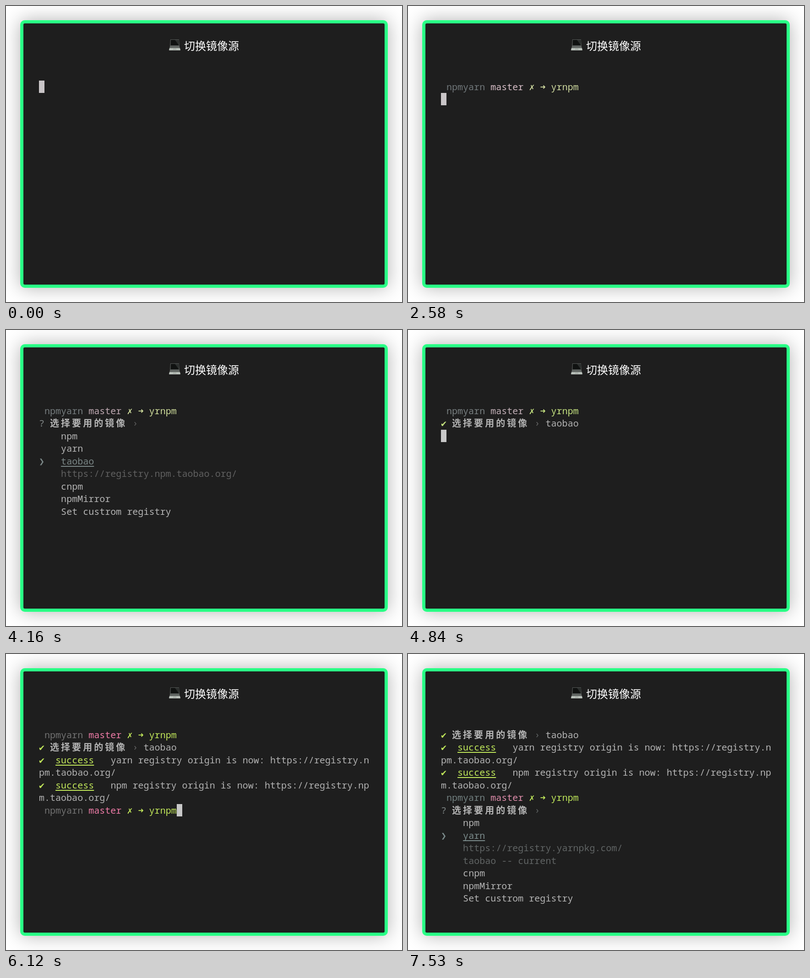
An HTML page for the animation above (8 s loop, 865x647 px).

```html
<!DOCTYPE html>
<html lang="zh-CN">
<head>
<meta charset="utf-8">
<title>切换镜像源</title>
<style>
  html, body { margin: 0; width: 100%; height: 100%; overflow: hidden; background: #fff; }
  #window {
    position: absolute; left: 31px; top: 31px; width: 803px; height: 585px;
    box-sizing: border-box; border: 7px solid #29ff86; border-radius: 10px;
    background: #1e1e1e; box-shadow: 0 0 40px rgba(0, 0, 0, .3);
  }
  #title {
    position: absolute; left: 389px; top: 68px; white-space: nowrap; color: #fff;
    font: 500 24px/36px "Noto Sans CJK SC", "Noto Sans CJK", sans-serif;
  }
  #laptop { position: absolute; left: 356px; top: 72px; }
  #screen {
    position: absolute; left: 72px; top: 163px;
    font: 20.05px/27.46px "Noto Sans Mono", "DejaVu Sans Mono", "Noto Sans CJK SC", "Noto Sans CJK", monospace;
    font-variant-ligatures: none;
  }
  #screen span { position: absolute; white-space: pre; color: var(--text); }
  #screen .dim { color: var(--dim); }
  #screen .branch { color: var(--branch); }
  #screen .green { color: var(--green); }
  #screen .command { color: var(--green); font-weight: 500; }
  #screen .mute { color: var(--mute); }
  #screen .ask { color: var(--ask); }
  #screen .accent { color: var(--accent); }
  #screen .warn { color: #f0a63c; }
  #screen .question { font-weight: 700; letter-spacing: 4px; }
  #screen .underline { text-decoration: underline 1.5px; text-underline-offset: 3px; text-decoration-skip-ink: none; }
  #screen .cursor { width: 12px; height: 27px; background: var(--cursor); }
</style>
</head>
<body>
<div id="window"></div>
<svg id="laptop" width="26" height="27">
  <path d="M3 1H22L23 16H2Z" fill="#555957"/>
  <path d="M4 2H21.500V14H3.500Z" fill="#101211"/>
  <path d="M13 2H21.500V14Z" fill="#2b2e2d"/>
  <path d="M2 16H23L24 21H1Z" fill="#626764"/>
  <path d="M1 20H24L25 24Q25 25 24 25H1Q0 25 0 24Z" fill="#b9c0ba"/>
  <path d="M9 21H16L16.500 23.500H8.500Z" fill="#a3aaa4"/>
</svg>
<div id="title">切换镜像源</div>
<div id="screen"></div>
<script>
const LOOP = 8000, CELL = 12.03, ROW = 27.46, COLS = 60, MAX_ROWS = 14;
const screen = document.getElementById("screen");

const roles = ["dim", "branch", "green", "text", "mute", "ask", "accent", "cursor"];
const palettes = [
  [0, "#70777a #d8bfc8 #d0dba0 #b5b5b5 #606060 #858b8b #7b8787 #c9c5c7"],
  [2770, "#757c7e #c0aab3 #d0de9c #b5b5b5 #606060 #858b8b #7b8787 #c7c7c7"],
  [4840, "#787f80 #c3b0b8 #c6e480 #b2b2b2 #6a6a6a #858b8b #7b8787 #c8c8c8"],
  [5150, "#727272 #ee7ba7 #c2e85a #b2b2b2 #666666 #b8b8b8 #777777 #c8c8c8"],
  [6940, "#696969 #ea7ba7 #c0e858 #b2b2b2 #636363 #bababa #777777 #c8c8c8"],
  [7530, "#728080 #df8dab #c0e85a #b4b4b4 #606464 #808888 #7b8b8b #c8c8c8"],
];

const options = ["npm", "yarn", "taobao", "cnpm", "npmMirror", "Set custrom registry"];
const urls = {
  npm: "https://registry.npmjs.org/",
  yarn: "https://registry.yarnpkg.com/",
  taobao: "https://registry.npm.taobao.org/",
};

// A row is a list of runs: column, style, text.
const run = (col, style, text) => ({ col, style, text });
const cursor = col => run(col, "cursor", "");

function prompt(typed = "", hasCursor = false) {
  const row = [
    run(1, "dim", "npmyarn"), run(9, "branch", "master"), run(16, "green", "✗"), run(18, "green", "➜"),
    run(20, typed === "yrnpm" ? "command" : "branch", typed),
  ];
  return hasCursor ? [...row, cursor(20 + typed.length)] : row;
}

const question = (mark, style, answer) =>
  [run(0, style, mark), run(2, "question", "选择要用的镜像"), run(17, "mute", "›"), ...answer];

function menu(selected, current) {
  const blocked = selected === current;
  const rows = [question("?", "ask", blocked ? [run(19, "warn", "- This option is disabled")] : [])];
  for (const name of options) {
    const active = name === selected, disabled = name === current;
    const style = disabled ? "mute" : active ? "accent" : "text";
    const row = [run(4, style + (active ? " underline" : ""), name + (disabled ? " -- current" : ""))];
    if (active) row.push(run(0, "accent", "❯"));
    rows.push(row);
    if (active && !disabled) rows.push([run(4, "mute", urls[name])]);
  }
  return rows;
}

function success(tool) {
  const message = `${tool} registry origin is now: ${urls.taobao}`, room = COLS - 13;
  return [
    [run(0, "green", "✔"), run(3, "green underline", "success"), run(13, "text", message.slice(0, room))],
    [run(0, "text", message.slice(room))],
  ];
}

const chosen = [prompt("yrnpm"), question("✔", "green", [run(19, "text", "taobao")])];
const yarnDone = [...chosen, ...success("yarn")];
const allDone = [...yarnDone, ...success("npm")];
const newLine = [cursor(0)];
const ask = selected => [prompt("yrnpm"), ...menu(selected)];
const askAgain = selected => [...allDone, prompt("yrnpm"), ...menu(selected, "taobao")];

const scenes = [
  [0, [newLine]],
  ...[30, 1160, 1280, 1710, 1910, 2110].map((time, i) => [time, [prompt("yrnpm".slice(0, i), true)]]),
  [2580, [prompt("yrnpm"), newLine]],
  [2770, ask("npm")],
  [3460, ask("yarn")],
  [4160, ask("taobao")],
  [4840, [...chosen, newLine]],
  [5150, [...yarnDone, newLine]],
  [5245, [...allDone, newLine]],
  [5340, [...allDone, prompt("", true)]],
  [6120, [...allDone, prompt("yrnpm", true)]],
  [6770, [...allDone, prompt("yrnpm"), newLine]],
  [6940, askAgain("taobao")],
  [7530, askAgain("yarn")],
];

const at = (list, time) => list.findLast(([start]) => start <= time)[1];

let shown;
function draw() {
  const time = performance.now() % LOOP, rows = at(scenes, time);
  if (rows !== shown) {
    shown = rows;
    at(palettes, time).split(" ").forEach((color, i) => screen.style.setProperty("--" + roles[i], color));
    screen.innerHTML = rows.slice(-MAX_ROWS).map((row, y) => row.map(({ col, style, text }) =>
      `<span class="${style}" style="left:${col * CELL}px;top:${y * ROW}px">${text}</span>`).join("")).join("");
  }
  requestAnimationFrame(draw);
}
draw();
</script>
</body>
</html>
```
